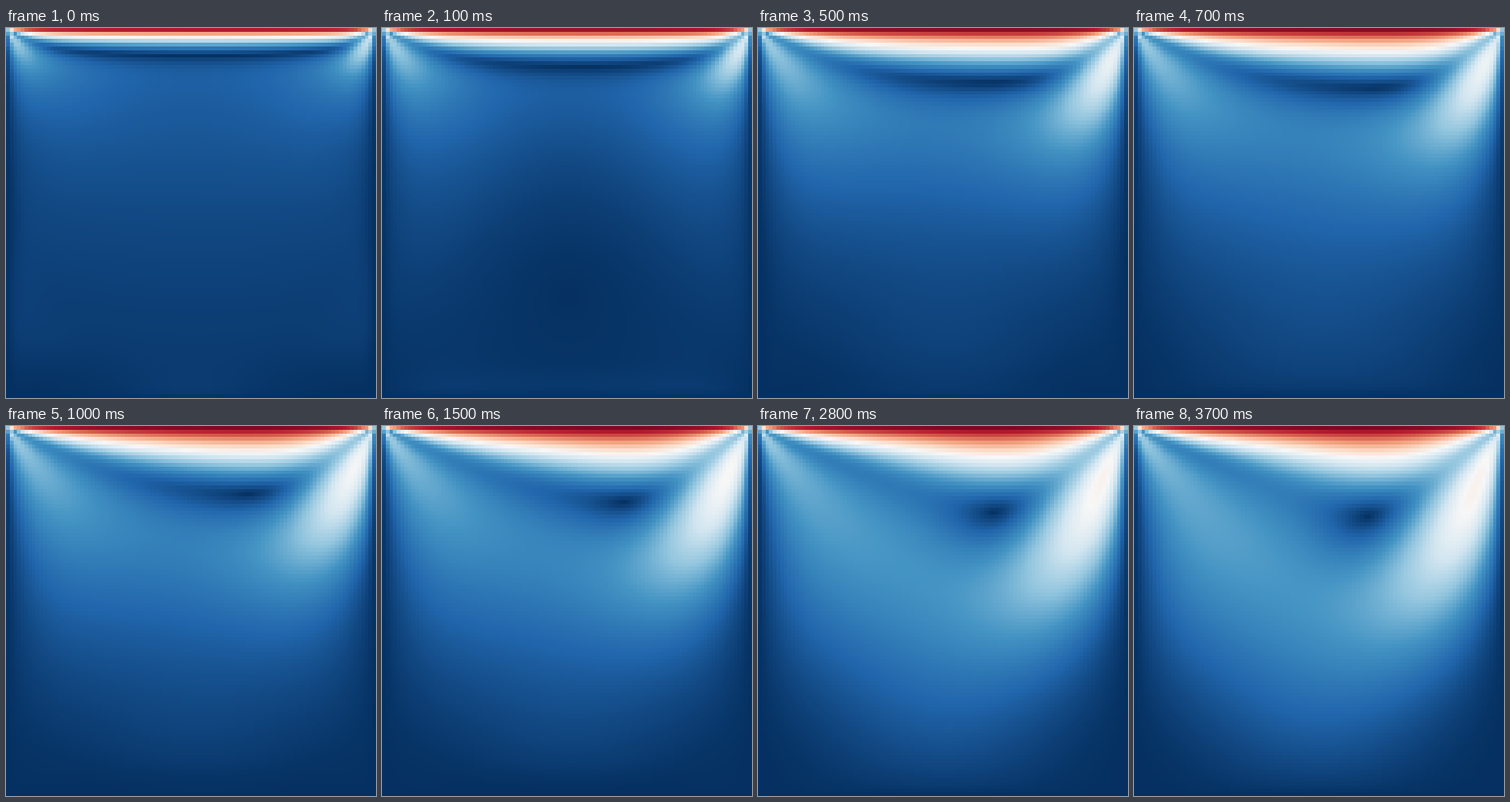
Write an HTML page with a canvas that moves like this. It is 480x480 px and loops after 4.2 s.

```html
<!DOCTYPE html>
<html lang="en">
<head>
<meta charset="utf-8">
<title>Lid-driven cavity</title>
<style>
html, body { margin: 0; width: 100%; height: 100%; overflow: hidden; background: #053061; }
canvas { display: block; width: 100vw; height: 100vh; }
</style>
</head>
<body>
<canvas id="stage" width="480" height="480"></canvas>
<script>
(() => {
  // Lattice Boltzmann (D2Q9) cavity flow at Re = 100, coloured by speed.
  const N = 100, W = N + 2, A = W * W;
  const LID = 0.05, VISCOSITY = LID * N / 100;
  const OMEGA = 1 / (3 * VISCOSITY + 0.5), KEEP = 1 - OMEGA;
  const FRAME_MS = 100, FRAME_COUNT = 42, STEPS_PER_FRAME = 200;
  const WARM_FRAMES = 12, STEPS_AHEAD = 50;

  const CX = [0, 1, 0, -1, 0, 1, -1, -1, 1];
  const CY = [0, 0, 1, 0, -1, 1, 1, -1, -1];
  const OPPOSITE = [0, 3, 4, 1, 2, 7, 8, 5, 6];
  const weight = i => i === 0 ? 4 / 9 : i < 5 ? 1 / 9 : 1 / 36;

  const RAMP = ['053061', '2166ac', '4393c3', '92c5de', 'd1e5f0', 'f7f7f7',
    'fddbc7', 'f4a582', 'd6604d', 'b2182b', '67001f']
    .map(hex => [0, 2, 4].map(i => parseInt(hex.slice(i, i + 2), 16)));

  let now = new Float64Array(9 * A), next = new Float64Array(9 * A);
  for (let i = 0; i < 9; i++) now.fill(weight(i), i * A, (i + 1) * A);

  // Half-way bounce-back: each link copies a reflected population to a ghost cell.
  const from = [], to = [], push = [];
  const outside = v => v < 1 || v > N;
  for (let y = 1; y <= N; y++) for (let x = 1; x <= N; x++) {
    for (let i = 1; i < 9; i++) {
      const gx = x - CX[i], gy = y - CY[i];
      if (!outside(gx) && !outside(gy)) continue;
      from.push(OPPOSITE[i] * A + y * W + x);
      to.push(i * A + gy * W + gx);
      push.push(gy === 0 ? 6 * weight(i) * CX[i] * LID : 0);
    }
  }
  const linkFrom = Int32Array.from(from), linkTo = Int32Array.from(to);
  const linkPush = Float64Array.from(push);

  function step(f, g) {
    for (let j = 0; j < linkTo.length; j++) f[linkTo[j]] = f[linkFrom[j]] + linkPush[j];
    for (let y = 1; y <= N; y++) {
      for (let k = y * W + 1, end = k + N; k < end; k++) {
        const a0 = f[k];
        const a1 = f[A + k - 1], a2 = f[2 * A + k - W];
        const a3 = f[3 * A + k + 1], a4 = f[4 * A + k + W];
        const a5 = f[5 * A + k - W - 1], a6 = f[6 * A + k - W + 1];
        const a7 = f[7 * A + k + W + 1], a8 = f[8 * A + k + W - 1];
        const rho = a0 + a1 + a2 + a3 + a4 + a5 + a6 + a7 + a8;
        const inv = 1 / rho;
        const u = (a1 + a5 + a8 - a3 - a6 - a7) * inv;
        const v = (a2 + a5 + a6 - a4 - a7 - a8) * inv;
        const base = 1 - 1.5 * (u * u + v * v);
        const axis = OMEGA * rho / 9, diag = axis / 4;
        const p = u + v, q = u - v;
        const eu = base + 4.5 * u * u, ev = base + 4.5 * v * v;
        const ep = base + 4.5 * p * p, eq = base + 4.5 * q * q;
        g[k] = KEEP * a0 + 4 * axis * base;
        g[A + k] = KEEP * a1 + axis * (eu + 3 * u);
        g[2 * A + k] = KEEP * a2 + axis * (ev + 3 * v);
        g[3 * A + k] = KEEP * a3 + axis * (eu - 3 * u);
        g[4 * A + k] = KEEP * a4 + axis * (ev - 3 * v);
        g[5 * A + k] = KEEP * a5 + diag * (ep + 3 * p);
        g[6 * A + k] = KEEP * a6 + diag * (eq - 3 * q);
        g[7 * A + k] = KEEP * a7 + diag * (ep - 3 * p);
        g[8 * A + k] = KEEP * a8 + diag * (eq + 3 * q);
      }
    }
  }

  function snapshot(f) {
    const image = new ImageData(N, N);
    for (let y = 0; y < N; y++) for (let x = 0; x < N; x++) {
      const k = (y + 1) * W + x + 1;
      let rho = 0, mx = 0, my = 0;
      for (let i = 0; i < 9; i++) {
        const a = f[i * A + k];
        rho += a;
        mx += a * CX[i];
        my += a * CY[i];
      }
      const level = Math.min(1, Math.hypot(mx, my) / rho / LID) * 10;
      const low = Math.min(9, Math.floor(level)), mix = level - low;
      const p = (y * N + x) * 4;
      for (let c = 0; c < 3; c++) {
        image.data[p + c] = RAMP[low][c] + (RAMP[low + 1][c] - RAMP[low][c]) * mix;
      }
      image.data[p + 3] = 255;
    }
    return image;
  }

  const frames = [];
  let steps = 0;
  function advance(count) {
    while (count-- > 0 && frames.length < FRAME_COUNT) {
      step(now, next);
      [now, next] = [next, now];
      if (++steps % STEPS_PER_FRAME === 0) frames.push(snapshot(now));
    }
  }

  const ctx = document.getElementById('stage').getContext('2d');
  ctx.imageSmoothingEnabled = false;
  const grid = document.createElement('canvas');
  grid.width = grid.height = N;
  const gridCtx = grid.getContext('2d');

  function draw(time) {
    const index = Math.floor(time / FRAME_MS) % FRAME_COUNT;
    while (frames.length <= index) advance(STEPS_PER_FRAME - steps % STEPS_PER_FRAME);
    gridCtx.putImageData(frames[index], 0, 0);
    ctx.drawImage(grid, 0, 0, 480, 480);
  }

  advance(WARM_FRAMES * STEPS_PER_FRAME);
  const start = performance.now();
  function tick() {
    draw(Math.max(0, performance.now() - start));
    advance(STEPS_AHEAD);
    requestAnimationFrame(tick);
  }
  tick();
})();
</script>
</body>
</html>
```
